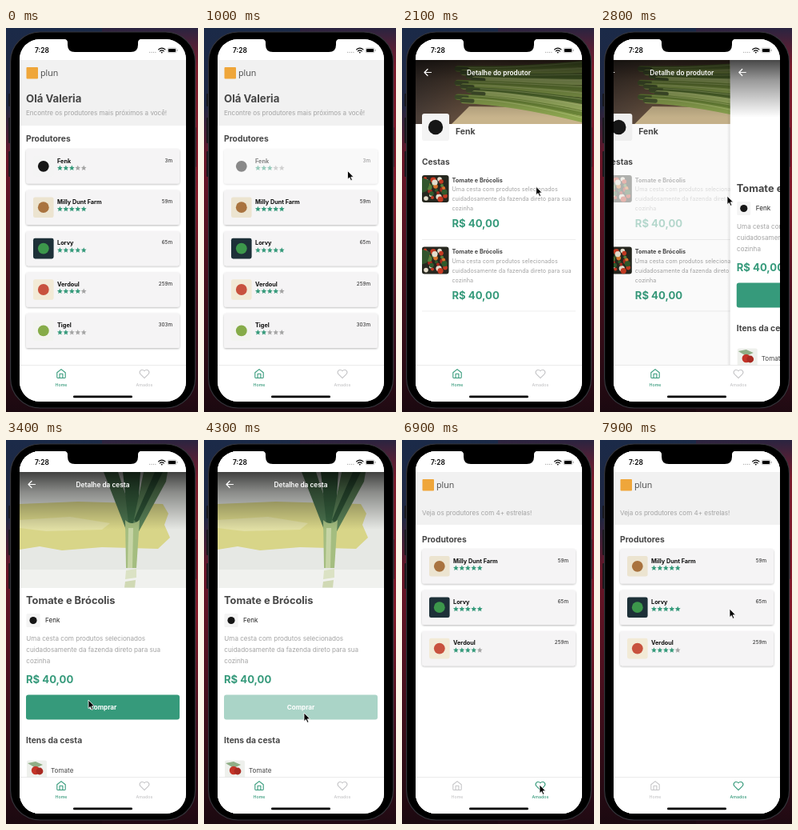
Animation, 240 px wide and 480 px high, one loop 8000 ms. Source, as an HTML page:

```html
<!DOCTYPE html>
<html lang="pt">
<head>
<meta charset="utf-8">
<title>Produtores</title>
<style>
html, body { margin: 0; width: 100%; height: 100%; overflow: hidden; background: #000; }
svg { display: block; width: 100vw; height: 100vh; }
text { font-family: Inter, Roboto, sans-serif; white-space: pre; }
.brand { font-family: "Open Sans", sans-serif; }
</style>
</head>
<body>
<svg id="stage" viewBox="0 0 240 480" xmlns="http://www.w3.org/2000/svg"></svg>
<script>
const LOOP = 8000, STEP = 100;
const ACCENT = '#369a7b', INK = '#464646', MUTED = '#a3a3a3', IDLE = '#c6c6c8';
const LEFT = 17, WIDTH = 208;

// Drawing helpers
const text = (x, y, size, str, fill = INK, weight = 400, anchor = 'start') =>
  `<text x="${x}" y="${y}" font-size="${size}" fill="${fill}" font-weight="${weight}" text-anchor="${anchor}">${str}</text>`;
const bold = (x, y, size, str, fill) => text(x, y, size, str, fill, 700);
const rect = (x, y, w, h, fill, r = 0, extra = '') =>
  `<rect x="${x}" y="${y}" width="${w}" height="${h}" rx="${r}" fill="${fill}" ${extra}/>`;
const circle = (x, y, r, fill) => `<circle cx="${x}" cy="${y}" r="${r}" fill="${fill}"/>`;
const path = (d, fill, extra = '') => `<path d="${d}" fill="${fill}" ${extra}/>`;
const line = (d, color, width, extra = '') =>
  path(d, 'none', `stroke="${color}" stroke-width="${width}" stroke-linecap="round" stroke-linejoin="round" ${extra}`);
const group = (id, body) => `<g id="${id}">${body}</g>`;
const times = (n, fn) => Array.from({ length: n }, (_, i) => fn(i)).join('');

const producers = [
  { name: 'Fenk', far: '3m', stars: 3, tile: '#f4f4f4', mark: '#161616' },
  { name: 'Milly Dunt Farm', far: '59m', stars: 5, tile: '#ece4d0', mark: '#a9733f' },
  { name: 'Lorvy', far: '65m', stars: 5, tile: '#1d3038', mark: '#3c974b' },
  { name: 'Verdoul', far: '259m', stars: 4, tile: '#f2ead6', mark: '#c8523e' },
  { name: 'Tigel', far: '303m', stars: 2, tile: '#f3f4f0', mark: '#86ac48' }
];

function tile(x, y, size, p) {
  return rect(x, y, size, size, p.tile, size / 11) + circle(x + size / 2, y + size / 2, size * 0.27, p.mark);
}

function star(cx, cy, fill) {
  const pts = Array.from({ length: 10 }, (_, i) => {
    const r = i % 2 ? 1.65 : 3.6, a = i * Math.PI / 5;
    return (cx + r * Math.sin(a)).toFixed(2) + ',' + (cy - r * Math.cos(a)).toFixed(2);
  });
  return `<polygon points="${pts.join(' ')}" fill="${fill}"/>`;
}

function card(p, y, id) {
  return group(id,
    rect(25, y, 192, 43.5, '#f5f4f5', 3.2, 'filter="url(#shade)"') +
    tile(34, y + 9, 25.6, p) +
    bold(64, y + 17.6, 7.3, p.name, '#0c0c0c') +
    text(208, y + 16.6, 6.4, p.far, '#222', 400, 'end') +
    times(5, i => star(67.4 + i * 7.45, y + 24, i < p.stars ? ACCENT : '#a5a5a5')));
}

const cards = (list, y, key) => list.map((p, i) => card(p, y + i * 51.4, key + i)).join('');
const blank = () => rect(LEFT, 14, WIDTH, 453, '#fff');
const logo = () => rect(25.5, 49, 14.5, 14.5, '#efa63a', 1) +
  '<text class="brand" x="43" y="60" font-size="10.6" fill="#444">plun</text>';

function homePage() {
  return blank() + rect(LEFT, 40, WIDTH, 82, '#f1f1f1') + logo() +
    bold(25, 92.8, 13.2, 'Olá Valeria') +
    text(25, 109, 8.06, 'Encontre os produtores mais próximos a você!', MUTED) +
    group('banner', rect(LEFT, 122, WIDTH, 44.6, '#e4f1ed') +
      text(25, 140, 8.06, 'Agradecemos a compra da cesta Tomate e') +
      text(25, 154, 8.06, 'Brócolis, seu pedido chegará em breve!')) +
    group('list', bold(25, 142.3, 10.3, 'Produtores') + cards(producers, 151, 'card'));
}

function lovedPage() {
  return blank() + rect(LEFT, 40, WIDTH, 66, '#f1f1f1') + logo() +
    text(25, 94, 8.06, 'Veja os produtores com 4+ estrelas!', MUTED) +
    bold(25, 127.5, 10.3, 'Produtores') +
    cards(producers.filter(p => p.stars > 3), 136, 'loved');
}

const topBar = title =>
  line('M36.5 55.5H28M32 51.5L28 55.5L32 59.5', '#fff', 1.2) +
  text(121, 58.5, 8.3, title, '#fff', 600, 'middle');

function asparagus() {
  const hues = ['#6f8a3a', '#8da650', '#567230', '#a0b565'];
  return rect(LEFT, 40, WIDTH, 80, 'url(#wood)') +
    path('M62 120L84 98L225 100V120Z', '#c8b48c') +
    times(10, i => {
      const x = 70 + (i * 5 % 4) * 7, y = 51 + i * 4.4, end = 44 + i * 8;
      const d = `M${x} ${y}Q140 ${y + 2} 232 ${end}`;
      return line(d, hues[i % 4], 7.5) +
        line(`M${x + 14} ${y - 1.5}Q140 ${y} 232 ${end - 2}`, '#bccb85', 1, 'opacity=".6"') +
        line(`M${x - 2} ${y}l13 .7`, '#4b5b32', 5);
    });
}

function vegetables(x, y) {
  const hues = ['#c43a22', '#2f5a2b', '#d8742c', '#e4ddcc', '#a92a1e', '#55803a'];
  return rect(x, y, 33.5, 34, '#26271f', 3) +
    times(24, i => circle(x + 4 + (i * 11 % 26), y + 4 + (i * 7 % 27), 2 + i % 3 * 0.8, hues[(i * 5 + (i >> 2)) % 6])) +
    path(`M${x} ${y + 3}l11 4l-5 13l-6 2z`, '#31552c');
}

const blurb = (x, y, size, gap) => ['Uma cesta com produtos selecionados',
  'cuidadosamente da fazenda direto para sua', 'cozinha']
  .map((s, i) => text(x, y + i * gap, size, s, MUTED)).join('');

const basketRow = (y, id) =>
  group(id, vegetables(25, y) +
    bold(62.5, y + 8.6, 7.3, 'Tomate e Brócolis') +
    blurb(62.5, y + 20, 7.2, 12) +
    bold(62.5, y + 65.3, 13.1, 'R$ 40,00', ACCENT)) +
  rect(25, y + 80, 192, 0.7, '#e6e6e6');

function producerPage() {
  return blank() + asparagus() + rect(LEFT, 40, WIDTH, 72, 'url(#fade)') +
    topBar('Detalhe do produtor') +
    tile(25, 107, 34, producers[0]) +
    bold(67, 132.6, 10.4, producers[0].name) +
    bold(25, 170.6, 10.2, 'Cestas') +
    basketRow(184, 'row') + basketRow(273.6, 'row2');
}

function leek() {
  return rect(LEFT, 40, WIDTH, 144.5, '#e6e8e4') +
    rect(LEFT, 162, WIDTH, 22.5, '#f0f1ee') +
    path('M17 80L90 77L196 80L203 92L198 106L205 122L190 136L120 134L70 138L42 133L17 137Z', '#d8d588') +
    path('M17 100L80 96L130 104L120 112L50 114L17 110Z', '#e1dfa4') +
    path('M122 40L150 112L157 122L160 100L140 40Z', '#4d7550') +
    path('M146 40L153 104L164 104L168 40Z', '#386340') +
    path('M172 40L159 104L164 118L200 52L202 40Z', '#5c8459') +
    path('M186 40L160 100L164 104L196 40Z', '#2f5638') +
    path('M149 100Q157 108 167 100L163 160H150Z', '#a4bd80') +
    path('M153 110L159 110L158 160H152Z', '#c7d5a6') +
    path('M150 163L163 161L163 172L149 174Z', '#dbe2c4') +
    path('M149 177L162 175L161 184.5H148Z', '#d0d9b4');
}

function basketPage() {
  return blank() + group('photo', leek()) + rect(LEFT, 40, WIDTH, 72, 'url(#fade)') +
    topBar('Detalhe da cesta') +
    bold(25, 205, 12.85, 'Tomate e Brócolis') +
    tile(25.5, 217, 17, producers[0]) +
    text(49, 228, 8.1, producers[0].name, '#222') +
    blurb(25.3, 251.4, 8.1, 14) +
    bold(25, 303.6, 13.1, 'R$ 40,00', ACCENT) +
    group('buy', rect(25, 318.5, 192, 31, ACCENT, 3) +
      text(121, 337, 8.1, 'Comprar', '#fff', 700, 'middle')) +
    bold(25, 379.3, 10.3, 'Itens da cesta') +
    rect(26, 400.5, 25, 25, '#eef0ec', 2) + path('M27 404l10 -2l9 4l-9 4z', '#8fae86') +
    circle(37, 413, 5.2, '#c43428') + circle(42, 414, 4.4, '#a92a22') +
    text(56, 416, 8.1, 'Tomate');
}

const tab = (id, x, icon, label) => group(id,
  `<g transform="translate(${x} 432)">${line(icon, 'currentColor', 1.1)}</g>` +
  text(x, 447.5, 5.3, label, 'currentColor', 500, 'middle'));

const tabBar = () => rect(LEFT, 421.5, WIDTH, 46, '#fff') + rect(LEFT, 421.3, WIDTH, 0.6, '#dedede') +
  tab('tabHome', 69, 'M-5.2 -1.2L0 -5.4L5.2 -1.2V4.4Q5.2 5.5 4 5.5H-4Q-5.2 5.5 -5.2 4.4ZM-1.9 5.5V.2H1.9V5.5', 'Home') +
  tab('tabLoved', 173, 'M0 5.6L-5 .6C-7.6 -2.4 -3.6 -7 0 -3.3C3.6 -7 7.6 -2.4 5 .6Z', 'Amados') +
  rect(84, 459.6, 74, 2.6, '#000', 1.3);

const statusBar = () => rect(LEFT, 14, WIDTH, 26, '#fff') +
  text(36, 31.2, 8.4, '7:28', '#000', 600) +
  times(4, i => circle(179.7 + i * 2.4, 30.3, 0.6, '#999')) +
  line('M190.6 26.9Q194.8 23.4 199 26.9M192.3 28.9Q194.8 26.8 197.3 28.9', '#000', 1.2) +
  circle(194.8, 30.6, 0.9, '#000') +
  rect(202, 25, 11, 5.8, '#fff', 1.7, 'stroke="#999" stroke-width=".6"') +
  rect(202.9, 25.9, 9.2, 4, '#000', 1) + rect(213.7, 27, 0.8, 1.8, '#888', 0.4);

const stops = list => list.map(([o, c, a = 1]) =>
  `<stop offset="${o}" stop-color="${c}" stop-opacity="${a}"/>`).join('');
const gradient = (id, list, across) =>
  `<linearGradient id="${id}" x2="${across ? 1 : 0}" y2="${across ? 0 : 1}">${stops(list)}</linearGradient>`;

const veil = id => rect(LEFT, 14, WIDTH, 453, '#000', 0, `id="${id}" opacity="0"`);
const edge = () => rect(LEFT - 4, 40, 4, 382, 'url(#edge)');

const stage = document.getElementById('stage');
stage.innerHTML = `<defs>
  ${gradient('wallL', [[0, '#1b2a48'], [0.2, '#1f2742'], [0.34, '#6a1527'], [0.6, '#4d101f'], [1, '#1b0910']])}
  ${gradient('wallR', [[0, '#2a2440'], [0.1, '#7c1b2b'], [0.45, '#861a2a'], [0.75, '#451020'], [1, '#1f0a12']])}
  ${gradient('wood', [[0, '#4a3e38'], [0.4, '#6d5440'], [1, '#5b4030']], true)}
  ${gradient('fade', [[0, '#000', 0.72], [0.35, '#000', 0.4], [1, '#000', 0]])}
  ${gradient('edge', [[0, '#000', 0], [1, '#000', 0.1]], true)}
  <filter id="shade" x="-5%" y="-15%" width="110%" height="135%">
    <feDropShadow dx="0" dy="1" stdDeviation="1" flood-color="#000" flood-opacity=".28"/>
  </filter>
  <clipPath id="screen">${rect(LEFT, 14, WIDTH, 453, '#000', 25)}</clipPath>
</defs>` +
  rect(0, 0, 120, 480, 'url(#wallL)') + rect(120, 0, 120, 480, 'url(#wallR)') +
  [[82, 16], [112, 32], [154, 32]].map(([y, h]) => rect(3.2, y, 4, h, '#17171b', 1)).join('') +
  rect(233, 124, 4.6, 50, '#17171b', 1) +
  rect(5.6, 5, 231, 470, '#000', 37, 'stroke="#35353b" stroke-width="1.2"') +
  `<g clip-path="url(#screen)">` +
    group('home', homePage() + veil('homeVeil')) +
    group('producer', edge() + producerPage() + veil('producerVeil')) +
    group('basket', edge() + basketPage()) +
    group('loved', lovedPage()) +
    statusBar() + tabBar() +
  '</g>' +
  path('M72 13.5Q77 14 77 18V21Q77 30 86 30H156Q165 30 165 21V18Q165 14 170 13.5Z', '#000') +
  group('cursor', path('M0 0V10.6L2.4 8.4L4.1 12.3L5.9 11.5L4.2 7.8H7.5Z', '#000',
    'stroke="#fff" stroke-width=".8" stroke-linejoin="round"'));

// Timeline
const PUSH_PRODUCER = 1090, PUSH_BASKET = 2740, BACK_HOME = 4480, SWITCH_TAB = 6800;
const PHOTO_READY = 2950;
const cursorX = [[100, 233], [600, 178], [1400, 181], [1700, 181], [2400, 159], [2800, 159], [3400, 103],
  [3900, 125], [4800, 125], [5600, 164], [6000, 164], [6600, 172], [6900, 172], [7600, 162]];
const cursorY = [[100, 277], [600, 177], [1400, 180], [1700, 180], [2400, 210], [2800, 210], [3400, 325],
  [3900, 341], [4800, 341], [5600, 142], [6000, 142], [6600, 431], [6900, 431], [7600, 211]];
const cardPress = [[900, 1], [1050, 0.25], [1100, 0.25], [1350, 1]];
const rowPress = [[2550, 1], [2700, 0.25], [2800, 0.35], [3000, 1]];
const buyPress = [[4150, 1], [4300, 0.42], [4400, 0.3], [4650, 1]];

const smooth = k => k * k * (3 - 2 * k);
function track(keys, t, ease = k => k) {
  if (t <= keys[0][0]) return keys[0][1];
  for (let i = 1; i < keys.length; i++) {
    const [t0, a] = keys[i - 1], [t1, b] = keys[i];
    if (t <= t1) return a + (b - a) * ease((t - t0) / (t1 - t0));
  }
  return keys[keys.length - 1][1];
}

// Critically damped spring, 0 to 1
function spring(ms) {
  if (ms <= 0) return 0;
  const w = Math.sqrt(1000 / 3) * ms / 1000;
  const k = 1 - Math.exp(-w) * (1 + w);
  return k > 0.998 ? 1 : k;
}

const el = id => document.getElementById(id);
const show = (id, on) => el(id).setAttribute('display', on ? 'inline' : 'none');
const move = (id, x, y = 0) => el(id).setAttribute('transform', `translate(${x.toFixed(2)} ${y.toFixed(2)})`);
const fade = (id, o) => el(id).setAttribute('opacity', o.toFixed(3));

function render(t) {
  const bought = t > BACK_HOME, loved = t >= SWITCH_TAB;
  const back = spring(t - BACK_HOME);
  const first = bought ? 1 - back : spring(t - PUSH_PRODUCER);
  const second = bought ? 1 - back : spring(t - PUSH_BASKET);

  move('home', -0.3 * WIDTH * first);
  fade('homeVeil', 0.07 * first);
  show('producer', first > 0 && !bought);
  move('producer', WIDTH * (1 - first) - 0.3 * WIDTH * second);
  fade('producerVeil', 0.07 * second);
  show('basket', second > 0);
  move('basket', WIDTH * (1 - second));
  show('photo', t >= PHOTO_READY);

  show('banner', bought);
  move('list', 0, bought ? 44.8 : 0);
  fade('card0', track(cardPress, t));
  fade('row', track(rowPress, t));
  fade('buy', track(buyPress, t));

  show('loved', loved);
  el('tabHome').setAttribute('color', loved ? IDLE : ACCENT);
  el('tabLoved').setAttribute('color', loved ? ACCENT : IDLE);

  show('cursor', t >= 100);
  move('cursor', track(cursorX, t, smooth), track(cursorY, t, smooth));
}

const start = performance.now();
function tick() {
  const t = (performance.now() - start) % LOOP;
  render(Math.floor(t / STEP) * STEP);
  requestAnimationFrame(tick);
}
tick();
</script>
</body>
</html>
```
